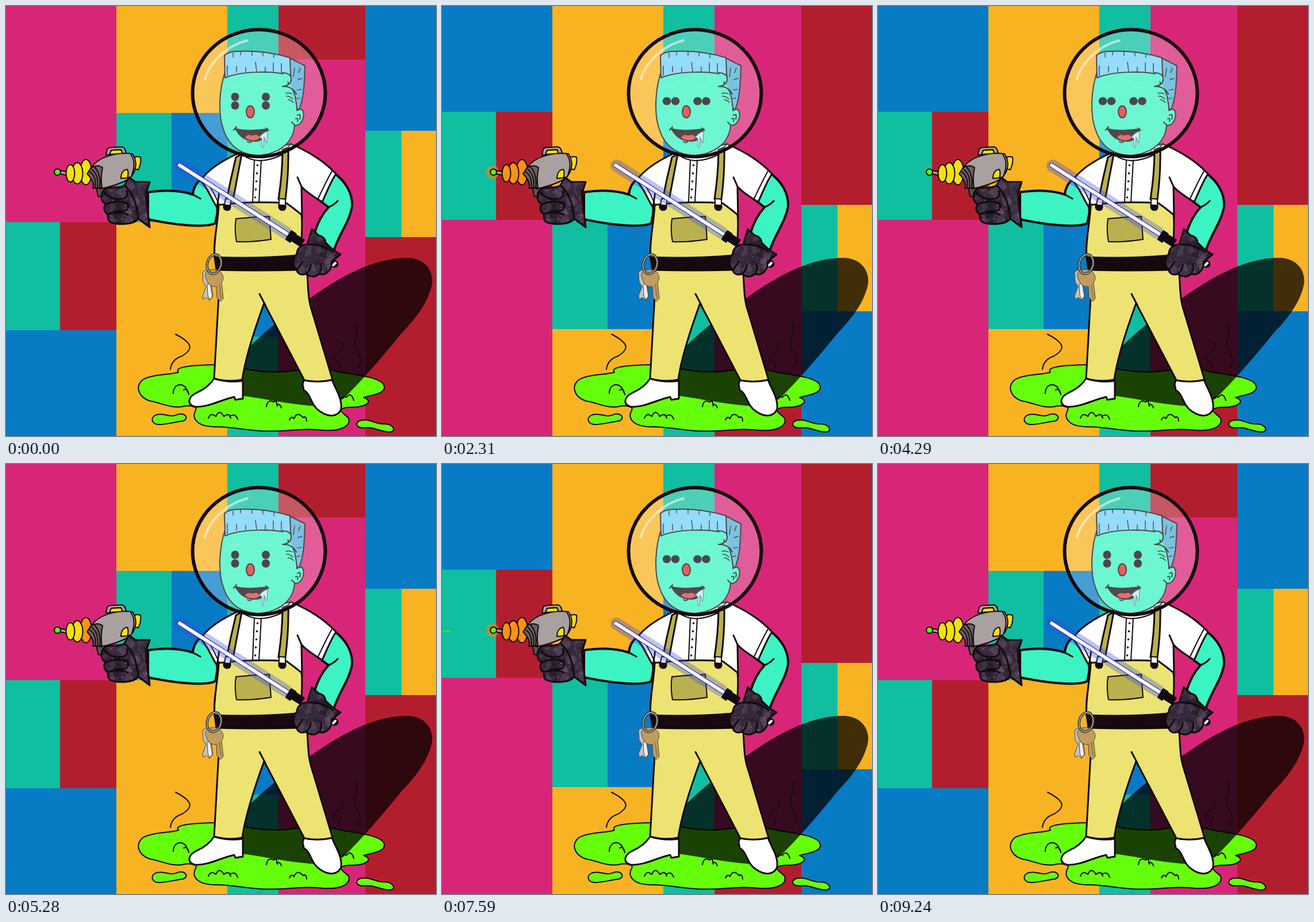
An HTML page that plays this animation: 748x748 px, repeating every 9.57 s.

```html
<!DOCTYPE html>
<html lang="en">
<head>
<meta charset="utf-8">
<title>Space gardener</title>
<style>
  html, body { margin: 0; width: 100%; height: 100%; overflow: hidden; }
  svg { display: block; width: 100vw; height: 100vh; }
  .ln { fill: none; }
  .ink { stroke: #14090c; stroke-width: 3; stroke-linejoin: round; stroke-linecap: round; }
  .thin { stroke-width: 2; }
  .skin { fill: #3cf3c3; }
  .cloth { fill: #ece373; }
  .strap { fill: #b9b04f; }
  .goo { fill: #66ff0b; }
  .gray { fill: #a9a1a0; }
  .yel { fill: #f3e00c; }
</style>
</head>
<body>
<svg viewBox="0 0 748 748" preserveAspectRatio="none">
  <defs>
    <clipPath id="gloves">
      <path id="gloveL" d="M214 298 L225 306 L250 306 L243 328 L250 385 L230 370 C222 381 195 381 182 376 C175 372 178 366 177 362 C169 358 170 348 174 345 C162 340 164 320 176 317 C188 314 198 318 206 312 Z"/>
      <path id="gloveR" d="M532 388 L544 399 Q556 402 556 413 Q567 424 582 432 L566 445 C568 460 555 470 545 466 C536 474 526 470 522 466 C513 470 506 464 506 459 C497 452 500 436 506 431 C506 420 516 415 524 415 Z"/>
    </clipPath>
  </defs>

  <g id="bgA"></g>
  <g id="bgB"></g>

  <!-- slime -->
  <g class="ink thin">
    <path class="goo" d="M300 637 C290 626 335 625 365 624 L412 630 Q460 642 515 632 L560 631 C580 641 655 641 658 662 C660 675 634 677 622 681 C640 687 628 699 596 698 C570 701 588 708 596 717 C601 733 578 740 552 738 C515 733 485 742 440 739 C415 737 390 732 365 732 C330 732 324 716 329 705 C336 696 320 694 306 697 C285 700 270 690 250 687 C230 680 224 662 238 650 C255 640 285 642 300 637 Z"/>
    <path class="goo" d="M262 711 C276 707 286 718 300 710 C312 707 319 718 308 722 C296 723 280 728 266 728 C253 728 250 715 262 711 Z"/>
    <path class="goo" d="M616 721 C634 717 642 728 658 727 C674 727 680 740 668 741 C650 741 640 731 622 734 C609 734 606 725 616 721 Z"/>
    <path class="ln" d="M291 674 C291 655 312 653 316 672 M309 668 Q316 664 318 676 M352 717 Q357 706 365 714 Q371 700 379 714 Q388 706 391 717 M389 714 Q399 707 403 719 M453 697 Q455 683 466 689 Q470 682 472 696 M471 694 Q477 691 479 699 M493 720 Q497 712 501 718 Q506 704 517 716 Q522 712 523 722 M584 683 Q588 677 592 681 Q600 670 605 686"/>
    <path class="ln" d="M295 571 C328 588 324 598 306 609 Q288 615 286 632"/>
  </g>
  <path fill="#000" fill-opacity=".74" d="M412 634 L414 602 C440 575 487 535 532 506 C580 472 640 437 700 438 C732 440 744 463 741 484 C735 515 712 545 690 567 C655 610 622 649 586 684 L540 696 C500 694 455 684 411 678 Z"/>
  <path class="ink thin ln" opacity=".75" d="M609 551 C616 576 600 580 609 598 Q624 621 610 628 M585 586 C590 604 570 602 569 615 C580 619 582 622 579 629"/>

  <!-- shoes, trousers -->
  <g class="ink">
    <path fill="#fff" d="M362 648 Q387 656 412 652 L412 683 L399 685 L397 680 C374 685 350 699 328 697 C314 693 317 680 331 673 Q352 664 362 648 Z"/>
    <path fill="#fff" d="M518 651 Q542 655 567 650 C572 665 585 681 583 701 C577 716 560 715 546 705 C530 695 531 675 518 668 L516 658 Z"/>
    <path class="cloth" d="M369 455 L370 505 L362 648 Q386 655 411 650 C416 612 433 561 449 517 L519 651 Q545 656 568 650 L532 530 C524 507 526 480 523 455 Z"/>
    <path class="ln" d="M441 501 L451 520"/>
  </g>

  <!-- arms, shirt -->
  <g class="ink">
    <path class="skin" stroke-width="4" d="M247 324 C280 319 304 321 325 328 C326 316 332 306 342 299 L370 348 L364 378 C345 387 290 380 247 371 Z"/>
    <path class="ln" d="M325 328 L338 335"/>
    <path class="skin" stroke-width="4" d="M570 290 C591 305 603 326 602 348 C598 375 580 395 570 426 L537 394 C543 374 552 360 561 350 L540 334 Z"/>
    <path class="ln" d="M561 350 Q571 346 577 339"/>
    <path fill="#fff" d="M407 255 C375 269 352 284 338 304 C351 315 358 338 367 350 L367 362 L515 370 L514 314 C522 324 539 334 550 341 C558 324 564 307 574 292 C552 268 525 253 496 240 Z"/>
    <path class="ln" d="M514 314 L507 298 M371 324 L367 350" />
    <path class="ln thin" d="M543 335 Q555 309 567 287 M344 299 Q360 319 370 344 M411 258 Q437 280 482 258 L496 239 M415 255 Q445 274 476 253 M432 268 L429 341 M444 268 L440 341"/>
  </g>
  <g id="buttons" fill="#14090c"></g>

  <!-- overalls -->
  <g class="ink">
    <path class="cloth" d="M370 346 Q430 339 488 343 Q502 353 514 363 C517 385 512 410 514 440 L363 438 C360 410 369 377 370 346 Z"/>
    <path class="strap" d="M400 263 L410 258 L395 337 L384 336 Q391 300 400 263 Z"/>
    <path class="strap" d="M481 250 L491 246 Q492 290 486 337 L474 336 Q481 290 481 250 Z"/>
    <g class="thin" fill="#fff">
      <path d="M382 335 L392 336 L390 347 L380 346 Z M475 335 L486 336 L486 347 L475 346 Z"/>
    </g>
    <path fill="#14090c" stroke-width="1" d="M378 347 h13 q1 9 -6 9 q-8 0 -7 -9 Z M474 347 h13 q1 9 -6 9 q-8 0 -7 -9 Z"/>
    <path class="strap thin" d="M400 370 Q430 367 458 366 L461 406 Q430 411 401 410 Q397 390 400 370 Z"/>
    <path fill="#17090d" d="M363 437 Q435 440 505 434 L507 459 Q435 461 366 459 Z"/>
  </g>

  <!-- keys -->
  <g stroke="#4a4740" stroke-width="1">
    <g fill="#c2c2c2">
      <path d="M342 463 q8 -8 15 2 l3 18 l-3 2 l3 20 l-6 7 l-5 -5 l-6 3 l-1 -6 l6 -16 l-5 -8 Z"/>
      <path fill="#eee" d="M350 484 l5 -2 l4 23 l-5 6 l-3 -8 Z"/>
    </g>
    <path fill="#c19c5c" d="M347 470 C344 460 358 457 367 459 C377 462 381 474 375 481 L378 509 L373 514 L367 507 L366 488 Q351 490 347 470 Z"/>
    <path class="ln" stroke="#775d2c" d="M371 484 L374 509"/>
    <ellipse class="ln" cx="362" cy="449" rx="12" ry="17" stroke="#332d2b" stroke-width="4.5" transform="rotate(14 362 449)"/>
    <ellipse class="ln" cx="362" cy="449" rx="12" ry="17" stroke="#aaa" stroke-width="1.8" transform="rotate(14 362 449)"/>
  </g>

  <!-- blade -->
  <g stroke-linecap="round">
    <path stroke="#3448d8" stroke-opacity=".33" stroke-width="22" d="M304 278 L486 394"/>
    <path stroke="#2633d8" stroke-width="8.5" d="M302 277 L490 397"/>
    <path stroke="#fff" stroke-width="6" d="M302 277 L490 397"/>
    <path stroke="#100b10" stroke-width="15" stroke-linecap="butt" d="M491 397 L516 413"/>
    <path stroke="#100b10" stroke-width="20" stroke-linecap="butt" d="M491 398 L500 404"/>
    <path stroke="#100b10" stroke-width="13" d="M560 441 L572 449"/>
    <path stroke="#fff" stroke-width="4" d="M569 451 L573 447"/>
  </g>

  <!-- ray gun -->
  <path id="bolt" stroke="#3be81f" stroke-width="3" stroke-linecap="round" d="M4 291 h10"/>
  <circle id="glow" cx="88" cy="289" r="11.5" fill="#ff8200" fill-opacity=".58"/>
  <g class="ink thin" stroke="#382e31">
    <path fill="#5b5051" d="M157 314 L173 314 L170 333 L160 331 Z"/>
    <path class="gray" d="M94 286 L108 289 L108 295 L94 292 Z"/>
    <circle cx="89.5" cy="289" r="5.5" fill="#5cf513"/>
    <path class="gray" d="M174 259 L176 249 Q178 246 184 246 L202 245 Q207 246 209 256 L203 258 L200 250 L183 251 L180 259 Z"/>
    <path class="yel" d="M180 258 L183 251 L200 250 L203 257 Z"/>
    <path class="yel" d="M224 263 Q229 261 234 263 Q236 273 230 285 L223 283 Z"/>
    <path class="gray" d="M148 282 C160 262 193 254 220 257 C228 269 229 286 214 301 C197 310 180 315 164 318 Z"/>
    <path class="yel" d="M200 300 C200 291 204 285 211 284 Q214 291 211 299 Z"/>
    <path class="ln" d="M217 258 Q227 272 219 294"/>
    <g id="rings">
      <ellipse cx="139" cy="289" rx="10" ry="22"/>
      <ellipse cx="124" cy="291" rx="9.5" ry="18.5"/>
      <ellipse cx="112" cy="291" rx="7.5" ry="15"/>
    </g>
    <path fill="#6d6263" d="M148 281 Q160 275 168 281 Q164 300 167 316 L151 317 Q155 306 141 292 Z"/>
    <path class="ln" d="M145 288 Q158 296 155 317 M149 284 Q162 294 159 317 M154 280 Q166 293 163 317"/>
  </g>

  <!-- gloves -->
  <g fill="#35283a"><use href="#gloveL"/><use href="#gloveR"/></g>
  <g id="dust" clip-path="url(#gloves)"></g>
  <g class="ink ln"><use href="#gloveL"/><use href="#gloveR"/></g>
  <path class="ink ln" d="M174 345 Q190 337 209 342 Q217 349 208 356 Q190 357 177 362 M172 325 Q185 339 203 335 Q214 333 210 322 M181 361 Q198 356 212 363 M206 312 Q227 330 230 370 M506 459 Q512 451 516 445 M522 466 Q531 458 530 450 M545 466 Q550 458 548 449 M524 415 Q549 413 568 428"/>

  <!-- head -->
  <g class="ink thin">
    <path class="skin" d="M382 112 C370 145 369 190 378 214 C387 243 407 258 437 260 C475 258 500 238 502 207 C512 210 520 195 517 184 Q514 176 506 182 L507 130 L490 95 Z"/>
    <path class="ln" d="M502 207 L497 202 M507 190 Q514 186 511 197 M504 196 Q509 194 507 201"/>
    <path fill="#4fadd7" d="M490 89 Q505 96 520 104 C519 130 519 157 510 180 Q506 182 505 170 C503 155 500 141 491 139 Z"/>
    <path fill="#70d0f7" d="M380 86 Q386 80 400 79 Q450 76 494 90 L495 118 Q497 124 493 121 C470 113 410 112 381 125 Z"/>
    <path class="skin" d="M481 116 Q495 117 496 125 Q497 138 481 140 Q498 139 505 153"/>
    <path class="ln" stroke-width="1.4" d="M395 82 v7 M408 80 v5 M428 80 v6 M447 81 v6 M466 85 v5 M385 104 v17 M401 105 v10 M417 107 v7 M434 98 l2 16 M451 106 v9 M465 99 v15 M479 100 v16 M502 108 l-2 15 M512 108 l-3 8 M515 126 l-7 2 M514 145 l-7 1 M511 160 l-5 1 M487 152 Q493 150 498 153 M488 157 Q495 157 499 162 M491 163 Q497 164 500 168"/>
    <path fill="#190c10" d="M399 213 C413 219 439 216 455 214 C453 228 445 236 431 235 C414 234 405 225 399 213 Z"/>
    <path fill="#df3e3d" stroke-width="1" d="M415 229 Q421 221 428 225 Q438 221 442 229 Q437 235 428 234 Q421 234 415 229 Z"/>
    <path class="ln" d="M396 216 L401 210 M452 212 L457 216 M420 236 Q424 239 427 236"/>
    <path fill="#bdf0f5" stroke="#426a7a" stroke-width="1.2" d="M441 228 Q447 220 455 218 L454 237 Q452 240 451 233 L449 228 L448 245 Q446 249 445 243 L445 231 Z"/>
    <ellipse cx="425" cy="184" rx="7" ry="10.5" fill="#dc2727"/>
  </g>
  <g id="eyes" fill="#0c0b10"></g>
  <path class="ln" stroke="#fff" stroke-opacity=".12" stroke-width="2" d="M389 142 q10 -4 19 0 M443 143 q10 -5 20 -1"/>

  <!-- helmet -->
  <ellipse cx="440" cy="151.5" rx="115.5" ry="110.5" fill="#fff" fill-opacity=".25" stroke="#14090c" stroke-width="6"/>
  <path class="ln" stroke="#fff" stroke-opacity=".55" stroke-width="4" stroke-linecap="round" d="M346 127 C354 98 385 68 420 60"/>
</svg>

<script>
const STEP = 330, STEPS = 29, CYCLE = 13;
const $ = id => document.getElementById(id);

function add(parent, tag, attrs) {
  const el = document.createElementNS('http://www.w3.org/2000/svg', tag);
  for (const k in attrs) el.setAttribute(k, attrs[k]);
  return parent.appendChild(el);
}

const hue = { p: '#d72678', y: '#f8b323', t: '#10bea0', r: '#b31e2f', b: '#087bc5' };
// A column is [x, end, split, rows]; a row is [top, colours], two colours share it at the split.
function wall(id, columns) {
  for (const [x, end, split, rows] of columns) {
    rows.forEach(([y, c], i) => {
      const height = (rows[i + 1] || [748])[0] - y;
      const box = (x, end, c) => add($(id), 'rect', { x, y, width: end - x, height, fill: hue[c] });
      box(x, c[1] ? split : end, c[0]);
      if (c[1]) box(split, end, c[1]);
    });
  }
}
wall('bgA', [
  [0, 192, 94, [[0, 'p'], [376, 'tr'], [564, 'b']]],
  [192, 385, 288, [[0, 'y'], [186, 'tb'], [376, 'y']]],
  [385, 474, 0, [[0, 't'], [376, 'b'], [575, 't']]],
  [474, 625, 0, [[0, 'r'], [93, 'p']]],
  [625, 748, 688, [[0, 'b'], [217, 'ty'], [402, 'r']]]
]);
wall('bgB', [
  [0, 192, 94, [[0, 'b'], [184, 'tr'], [372, 'p']]],
  [192, 385, 288, [[0, 'y'], [372, 'tb'], [562, 'y']]],
  [385, 474, 0, [[0, 't'], [186, 'b'], [376, 't']]],
  [474, 625, 0, [[0, 'p'], [655, 'r']]],
  [625, 748, 688, [[0, 'r'], [346, 'ty'], [531, 'b']]]
]);

for (let i = 0; i < 5; i++) add($('buttons'), 'circle', { cx: 437.5 - i, cy: 277 + i * 14, r: 1.8 });

// Starry speckles on the gloves
let seed = 7;
const rnd = () => (seed = seed * 16807 % 2147483647) / 2147483647;
for (const [x, y, w, h] of [[165, 302, 85, 80], [500, 395, 80, 75]]) {
  for (let i = 0; i < 110; i++) {
    const big = i < 50;
    add($('dust'), 'circle', {
      cx: x + rnd() * w, cy: y + rnd() * h,
      r: big ? 3 + rnd() * 6 : .4 + rnd() * .6,
      fill: big ? ['#6a5370', '#574660', '#1a121e'][i % 3] : '#b19aaa',
      'fill-opacity': big ? .4 : .7
    });
  }
}

const eyes = [[398.5, 165.5], [452, 165.5]].map(([x, y]) => {
  const g = add($('eyes'), 'g', {});
  for (const cy of [-7.5, 7.5]) add(g, 'ellipse', { cx: 0, cy, rx: 7, ry: 7.3 });
  return { g, x, y };
});
const rings = [...$('rings').children];
const show = (el, on) => el.setAttribute('visibility', on ? 'visible' : 'hidden');

function draw(now) {
  const step = Math.floor(now / STEP) % STEPS;
  const odd = step % 2;
  const phase = step % CYCLE;
  const charged = phase < 11 ? phase - 2 : 0;
  const shot = phase - 8;

  show($('bgA'), !odd);
  show($('bgB'), odd);
  for (const { g, x, y } of eyes) g.setAttribute('transform', `translate(${x} ${y}) rotate(${odd * 90})`);
  rings.forEach((r, i) => r.setAttribute('fill', i < charged ? '#ff9210' : '#f3e00c'));
  show($('glow'), charged > 3);
  show($('bolt'), shot >= 0 && shot < 3);
  $('bolt').setAttribute('transform', `translate(${(2 - shot) * 28} 0)`);
}

const start = performance.now();
function tick() {
  draw(performance.now() - start);
  requestAnimationFrame(tick);
}
tick();
</script>
</body>
</html>
```
